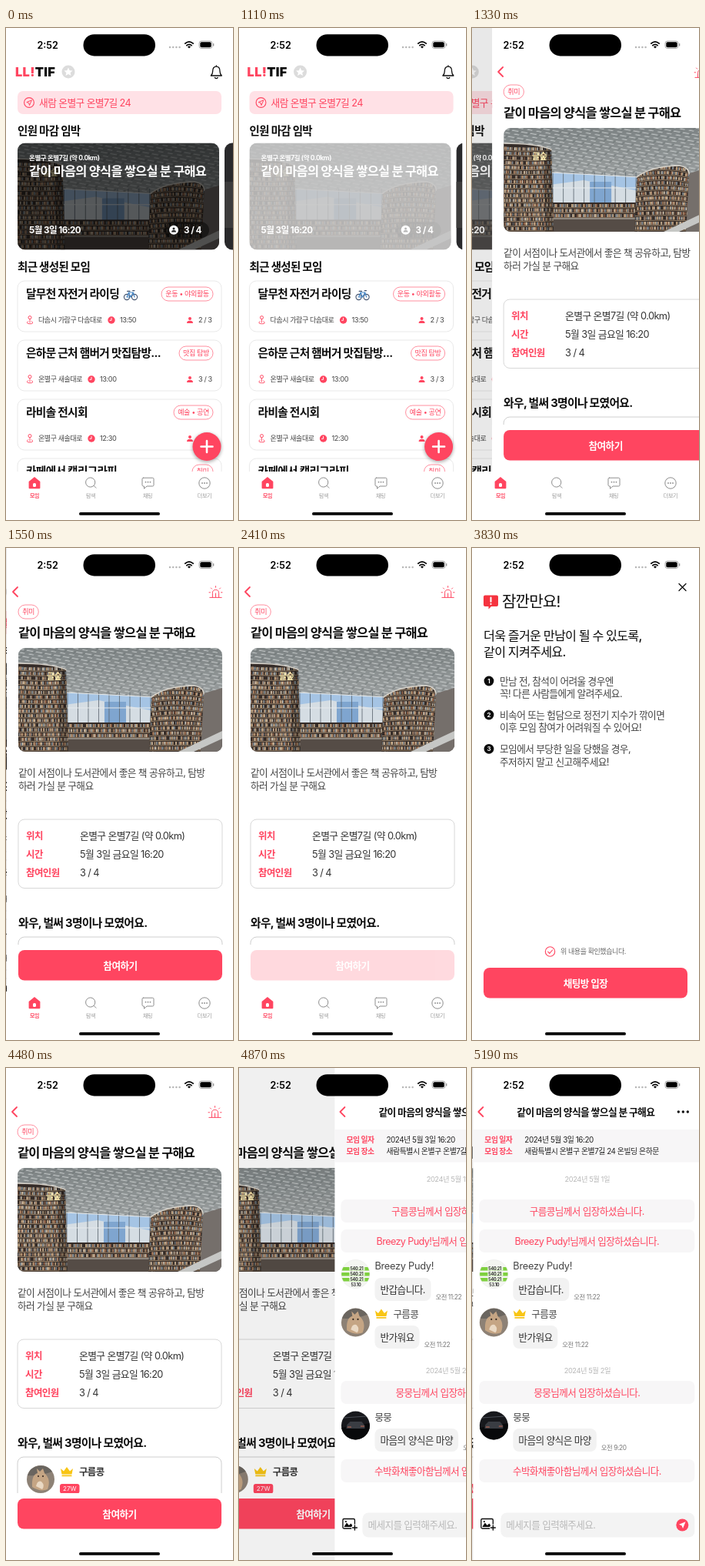
An HTML page for the animation above (6.44 s loop, 295 px wide and 640 px high).

```html
<!DOCTYPE html>
<html lang="ko">
<head>
<meta charset="utf-8">
<title>모임 앱</title>
<style>
html, body { margin: 0; width: 100%; height: 100%; overflow: hidden; background: #fff; }
svg { display: block; }
#stage { width: 295px; height: 640px; }
text { font-family: Inter, "Noto Sans CJK KR", "Noto Sans CJK", sans-serif; white-space: pre; }
.line { fill: none; stroke-linecap: round; stroke-linejoin: round; }
</style>
</head>
<body>
<svg id="stage" viewBox="0 0 295 640"></svg>
<script>
const W = 295, H = 640, LOOP = 6440;
const RED = '#ff4560', INK = '#0c0c0c', GREY = '#444', PALE = '#b9b9b9';

// --- drawing helpers ---
// y is the vertical middle of the line of text
const text = (s, x, y, size, fill = INK, weight = 400, anchor = 'start', track = -.047) =>
  `<text x="${x}" y="${(y + size * .37).toFixed(2)}" font-size="${size}" fill="${fill}" font-weight="${weight}" text-anchor="${anchor}" style="letter-spacing:${track}em">${s}</text>`;
const mid = (s, x, y, size, fill, weight, track) => text(s, x, y, size, fill, weight, 'middle', track);
const box = (x, y, w, h, r, fill, stroke = 'none', more = '') =>
  `<rect x="${x}" y="${y}" width="${w}" height="${h}" rx="${r}" fill="${fill}" stroke="${stroke}" ${more}/>`;
const dot = (x, y, r, fill, stroke = 'none', sw = 1) =>
  `<circle cx="${x}" cy="${y}" r="${r}" fill="${fill}" stroke="${stroke}" stroke-width="${sw}"/>`;
const shape = (d, fill) => `<path d="${d}" fill="${fill}"/>`;
const line = (d, stroke, sw = 1) => `<path class="line" d="${d}" stroke="${stroke}" stroke-width="${sw}"/>`;
const at = (x, y, s) => `<g transform="translate(${x} ${y})">${s}</g>`;
const group = (id, s) => `<g id="${id}">${s}</g>`;
const page = (id, s) => group(id, box(0, 0, W, H, 0, '#fff') + s);
const clip = (id, s) => `<g clip-path="url(#${id})">${s}</g>`;
const repeat = (n, fn) => Array.from({ length: n }, (_, i) => fn(i)).join('');

// --- shared pieces ---
const person = (x, y, c, k = 1) => at(x, y, `<g transform="scale(${k})">` +
  dot(0, -2, 2, c) + shape('M-4 4Q-4 .7 0 .7T4 4Z', c) + '</g>');
const crown = (x, y) => at(x, y,
  shape('M-8 -4L-4 -.5L0 -6L4 -.5L8 -4L6.5 3.5H-6.5Z', '#f8c514') + box(-6.5, 4.5, 13, 1.8, .5, '#f8c514'));
const pill = (s, right, y, w) =>
  box(right - w, y - 9, w, 18, 9, '#fff', RED, 'stroke-width=".6"') + mid(s, right - w / 2, y, 9.1, RED);
const back = line('M14 51L8 57L14 63', RED, 1.8);
const button = (y, s) => box(15, y, 265, 39.5, 8, RED) + mid(s, 147.5, y + 20, 12.7, '#fff', 600);

const avatar = {
  pet: (x, y, r) => at(x, y, `<g transform="scale(${r / 18})">` + dot(0, 0, 18, '#8d8175') +
    shape('M-17 -5A18 18 0 0 1 15 -10Q0 -4 -17 -5Z', '#6a655f') +
    shape('M-11 10Q-12 -6 -4 -8L-5 -14L-1 -10L3 -14L5 -8Q14 0 9 13Q0 17 -11 10Z', '#c5a584') +
    shape('M-6 9Q-4 1 1 3Q6 8 2 13Z', '#ead9c4') + dot(-3, -4, 1, '#2b211b') + dot(3, -4, 1, '#2b211b') + '</g>'),
  sheet: (x, y) => at(x, y, clip('round', box(-19, -19, 38, 38, 0, '#f4f6f1') +
    [-7, 0, 7].map(v => box(-19, v - 2, 38, 4.5, 0, '#7ed03f') + box(-8, v - 2, 20, 4.5, 0, '#e8f5dd') +
      text('540.21', -7, v + .2, 5.5, '#333', 700)).join('') + text('53.10', -6, 14, 5.5, '#333', 700)) +
    dot(0, 0, 18.5, 'none', '#e4e4e4', .5)),
  night: (x, y) => at(x, y, clip('round', box(-19, -19, 38, 38, 0, '#17181c') +
    shape('M-19 3L19 -3V19H-19Z', '#08090b') + shape('M-11 -1L-7 -5H8L12 0V4H-12Z', '#3a3d43') +
    line('M-10 2H-6M7 1H11', '#c96a55', 1.2) + line('M-15 -10L14 -12', '#494d55', 1)))
};

// --- library picture ---
let seed = 7;
const rand = () => (seed = seed * 16807 % 2147483647) / 2147483647;
const SPINES = ['#cfc2ae', '#93644a', '#77828a', '#b99b78'];
// one curved row of books standing on a pale board
const shelf = (x, y, w, bend) => {
  const d = dy => `M${x} ${y + dy}q${w / 2} ${bend} ${w} 0`;
  const row = c => `<path d="${d(0)}" fill="none" stroke="${c}" stroke-width="3.8" stroke-dasharray="${
    Array.from({ length: 6 }, (_, i) => (i % 2 ? 2 + rand() * 6 : .7 + rand() * 1.6).toFixed(1))}"/>`;
  return SPINES.map(row).join('') + line(d(2.8), '#ab9274', .8);
};
const tower = (id, d, x, y, w, bend) => shape(d, '#352c28') +
  clip(id, repeat(19, i => shelf(x, y + i * 6.2, w, bend * (1 - i / 12))));
const LEFT = 'M0 20Q42 20 62 28L65 135H0Z', RIGHT = 'M173 64Q190 50 228 49Q241 51 241 60L237 135H170Z';

const library = box(0, 0, 265, 135, 0, 'url(#roof)') + box(0, 0, 265, 80, 0, 'url(#tiles)') +
  shape('M60 58L176 64V122H60Z', '#a5c4e4') + shape('M60 74L104 68L176 82V105H60Z', '#d5dde3') +
  shape('M112 70H140V100H112Z', '#7fa5cf') +
  repeat(9, i => line(`M${64 + i * 13.5} 58V100`, '#59646d', .8)) +
  line('M60 78H176M60 58L176 64', '#e6eaec', 1) +
  box(60, 97, 118, 22, 0, '#352c28') + repeat(3, i => shelf(60, 101 + i * 6.5, 118, 0)) +
  box(60, 117, 205, 18, 0, '#554c46') + line('M60 118H176', '#c8c1b8', 1.2) +
  shape('M238 60L265 52V135H236Z', '#756f6b') +
  tower('leftTower', LEFT, -4, 26, 72, 3) + shape('M52 25L62 28L65 135H54Z', '#0004') +
  tower('rightTower', RIGHT, 168, 56, 76, -9) +
  line('M173 64Q190 50 228 49Q241 51 241 60M0 20Q42 20 62 28', '#d7d2c9', 1.4) +
  shape('M208 135L265 108V118L228 135Z', '#c6c7c5') +
  text('글숲', 37, 37, 11, '#ffeeb0', 700);
const photo = (x, y, w, h) =>
  `<svg x="${x}" y="${y}" width="${w}" height="${h}" viewBox="0 0 265 135" preserveAspectRatio="xMidYMid slice">${library}</svg>`;

// --- status bar ---
const status = group('status',
  text('2:52', 40.5, 22, 12.6, '#000', 600, 'start', 0) + box(100.5, 8.2, 93.5, 28.3, 14.1, '#000') +
  repeat(4, i => dot(213 + i * 4.2, 25, 1.2, '#b5b5b5')) +
  line('M232.8 20.2Q238 15.6 243.2 20.2M234.8 22.7Q238 19.9 241.2 22.7', '#000', 1.7) + shape('M235.9 24.3Q238 22.7 240.1 24.3L238 26.6Z', '#000') +
  box(251, 17, 17, 9.5, 3, 'none', '#999', 'stroke-width=".8"') + box(252.3, 18.3, 14.4, 6.9, 1.8, '#000') + box(269, 20, 1.3, 3.5, .6, '#999') +
  box(95, 630, 105, 3.8, 1.9, '#000'));

// --- home ---
const meeting = ([title, tag, tagW, place, clockX, time, count], i) => at(0, i * 77,
  box(15, 329, 265, 66, 9, '#fff', '#e9e9e9') + text(title, 26, 346, 14.7, INK, 700) + pill(tag, 269, 346, tagW) +
  dot(31, 376.6, 2, '#fff', RED, 1) + line('M31 378.8V383M28.6 381.6Q25 384.6 31 384.8T33.4 381.6', RED, .9) +
  text(place, 42, 380, 9, GREY) + dot(clockX, 380, 4.7, RED) + line(`M${clockX} 377.4V380.3H${clockX - 2}`, '#fff', .9) +
  text(time, clockX + 11, 380, 9.2, GREY) + person(239, 380, RED) + text(count, 250, 380, 9.2, GREY));

const bike = at(162, 348,
  dot(-5, 2, 3.6, 'none', '#40506b', 1.1) + dot(5, 2, 3.6, 'none', '#40506b', 1.1) +
  line('M-5 2L-2.5 -4H3.2L5 2M-2.5 -4L0 2L3.2 -4M-5 2H0', '#3f83c5', 1.1) + line('M-4.4 -5.6H-1M2.6 -6.4H5', '#40506b', 1.1));

const home = page('home',
  `<text x="12" y="63" font-size="16.4" font-weight="900" fill="${RED}" letter-spacing=".3">LL!<tspan fill="${INK}">TIF</tspan></text>` +
  dot(81, 57, 8.5, '#dcdcdc') + shape('M81 51.6L82.7 55.2L86.5 55.6L83.6 58.2L84.5 62L81 60L77.5 62L78.4 58.2L75.5 55.6L79.3 55.2Z', '#fff') +
  line('M266.3 62H280.3Q278 60 278 56.4Q278 50.2 273.3 50.2T268.6 56.4Q268.6 60 266.3 62ZM271.4 64.5Q273.3 66.6 275.2 64.5M273.3 48.8V50', INK, 1.3) +
  box(15, 82, 265, 30, 7, '#ffe1e6') + dot(30, 97, 6.4, 'none', RED, 1.1) + line('M33 94L26.8 96.6L29.6 97.4L30.4 100.2Z', RED, 1) +
  text('새람 온별구 온별7길 24', 43, 97, 12.75, RED) +
  text('인원 마감 임박', 15, 134, 14.5, INK, 700) +
  group('hero', clip('heroClip', photo(15, 149.5, 262, 139) + box(15, 149.5, 262, 139, 0, '#000', 'none', 'opacity=".6"')) +
    text('온별구 온별7길 (약 0.0km)', 30, 169, 8.5, '#fff', 700) + text('같이 마음의 양식을 쌓으실 분 구해요', 30, 186, 16.4, '#fff', 700) +
    text('5월 3일 16:20', 30, 262.5, 11.6, '#fff', 700) + box(206, 252, 58, 21.5, 10.7, '#0007') +
    dot(218, 262.7, 6, '#fff') + person(218, 262.4, '#222', .75) + text('3 / 4', 231, 262.7, 11.7, '#fff', 700)) +
  box(284, 149.5, 262, 139, 10, '#29292b') + box(284, 200, 30, 60, 0, '#3c3b3b') +
  text('최근 생성된 모임', 15, 310.5, 14.5, INK, 700) +
  [['달무천 자전거 라이딩', '운동 • 야외활동', 67, '다솜시 가람구 다솜대로', 137, '13:50', '2 / 3'],
   ['은하문 근처 햄버거 맛집탐방...', '맛집 탐방', 44, '온별구 새솔대로', 111, '13:00', '3 / 3'],
   ['라비솔 전시회', '예술 • 공연', 51, '온별구 새솔대로', 111, '12:30', '2 / 4'],
   ['카페에서 캘리그라피', '취미', 27, '온별구 새솔대로', 111, '12:00', '2 / 4']].map(meeting).join('') + bike +
  `<circle cx="261" cy="546" r="19" fill="#000" opacity=".3" filter="url(#soft)"/>` +
  dot(261, 544.5, 18.5, RED) + line('M253.5 544.5H268.5M261 537V552', '#fff', 2.6));

// --- tab bar ---
const tab = (s, x, c, w) => mid(s, x, 608.7, 7, c, w);
const tabs = group('tabs', box(0, 577, W, 63, 0, '#fff') +
  shape('M37 584L44.4 590V598.2Q44.4 599.3 43.3 599.3H30.7Q29.6 599.3 29.6 598.2V590Z', RED) + box(35, 592, 4, 5, 1.6, '#fff') +
  dot(109.7, 591, 6.1, 'none', '#8d8d8d', 1) + line('M114.2 595.5L117 598.3', '#8d8d8d', 1) +
  line('M178.5 585.2H190.5Q192 585.2 192 586.7V594.5Q192 596 190.5 596H183L179.5 599.2V596H178.5Q177 596 177 594.5V586.7Q177 585.2 178.5 585.2Z', '#8d8d8d', 1) +
  dot(258, 592, 7.2, 'none', '#8d8d8d', 1) +
  [-3, 0, 3].map(d => dot(184.5 + d, 590.7, .9, '#8d8d8d') + dot(258 + d, 592, .9, '#8d8d8d')).join('') +
  tab('모임', 37, RED, 700) + tab('탐색', 110, '#999') + tab('채팅', 184, '#999') + tab('더보기', 258, '#999'));

// --- meeting details ---
const fact = ([k, v], i) => text(k, 25, 374.3 + i * 23.8, 12.5, RED, 700) + text(v, 95, 374.3 + i * 23.8, 12.8, '#333');
const siren = line('M267.4 63.8V58.6Q267.4 54.4 271.5 54.4T275.6 58.6V63.8M263.8 64.4H279.2' +
  'M271.5 49.6V51.2M265.4 52L266.5 53.1M277.6 52L276.5 53.1M263 57.8H264.4M278.6 57.8H280M271.5 59V63.6', RED, 1);
const detail = page('detail', back + siren +
  pill('취미', 41.3, 83, 26.3) + text('같이 마음의 양식을 쌓으실 분 구해요', 15, 110, 16.4, INK, 700) +
  clip('photoClip', photo(15, 130, 265, 135)) +
  text('같이 서점이나 도서관에서 좋은 책 공유하고, 탐방', 15, 292.5, 12.7, GREY) + text('하러 가실 분 구해요', 15, 309, 12.7, GREY) +
  box(15, 353, 265, 89.5, 8, '#fff', '#d8d8d8') +
  [['위치', '온별구 온별7길 (약 0.0km)'], ['시간', '5월 3일 금요일 16:20'], ['참여인원', '3 / 4']].map(fact).join('') +
  text('와우, 벌써 3명이나 모였어요.', 15, 487.5, 14.8, INK, 700) +
  box(15, 506, 265, 120, 8, '#fff', '#cfcfcf') + avatar.pet(45, 535, 18) + crown(79, 525) + text('구름콩', 95, 525, 12.4, '#333', 600) +
  box(70, 541, 25.5, 12.5, 3, RED) + mid('27W', 82.8, 547.2, 8.2, '#fff', 400, 0) +
  group('joinBar', box(0, -7, W, 140, 0, '#fff') + group('join', button(0, '참여하기'))));

// --- rules sheet ---
const rule = ([y, a, b], i) => dot(22, y, 6.4, INK) + mid(i + 1, 22, y, 8, '#fff', 700, 0) +
  text(a, 36, y, 12.7, GREY) + text(b, 36, y + 16.5, 12.7, GREY);
const sheet = page('sheet',
  line('M269 46.5L278 55.5M278 46.5L269 55.5', INK, 1.3) +
  shape('M17 61.5H32Q34 61.5 34 63.5V74Q34 76 32 76H25L21.5 79.5V76H17Q15 76 15 74V63.5Q15 61.5 17 61.5Z', '#f5333f') +
  line('M24.5 64.5V69.8M24.5 72.8V73', '#fff', 2) +
  text('잠깐만요!', 39, 70, 20.2) + text('더욱 즐거운 만남이 될 수 있도록,', 15, 114.5, 16.2, INK, 500) + text('같이 지켜주세요.', 15, 135, 16.2, INK, 500) +
  [[173, '만남 전, 참석이 어려울 경우엔', '꼭! 다른 사람들에게 알려주세요.'],
   [217, '비속어 또는 험담으로 정전기 지수가 깎이면', '이후 모임 참여가 어려워질 수 있어요!'],
   [261.3, '모임에서 부당한 일을 당했을 경우,', '주저하지 말고 신고해주세요!']].map(rule).join('') +
  `<g id="agree" stroke="#555"><circle cx="101.5" cy="525" r="6.2" fill="none" stroke-width="1.1"/>` +
  `<path class="line" d="M98.7 525.2L100.8 527.3L104.5 523" stroke-width="1.1"/></g>` +
  text('위 내용을 확인했습니다.', 115, 525, 9, '#666') +
  `<g id="enter">${box(15, 546, 265, 39.5, 8, '#ececec')}${mid('채팅방 입장', 147.5, 566, 12.6, INK, 700)}</g>`);

// --- chat ---
const notice = (y, who) => box(8, y, 280, 30, 7, '#f7f6f7') + mid(`${who}님께서 입장하셨습니다.`, 148, y + 15, 12.6, RED);
const bubble = (y, w, s, time) => box(52, y, w, 30, 8, '#f2f2f2') + text(s, 59, y + 15, 12.7, '#333') + text(time, 58 + w, y + 25, 8.3, '#777');
const day = (n, y) => mid(`2024년 5월 ${n}일`, 148.5, y, 9.3, PALE);
const chat = page('chat', at(-1, 0, back) +
  mid('같이 마음의 양식을 쌓으실 분 구해요', 146.5, 57, 12.75, INK, 700) + [267, 273, 279].map(x => dot(x, 57, 1.7, INK)).join('') +
  box(0, 80, W, 42.5, 0, '#f7f6f7') +
  text('모임 일자', 15, 93.3, 9.8, RED, 700) + text('2024년 5월 3일 16:20', 67, 93.3, 9.9, '#222') +
  text('모임 장소', 15, 108.3, 9.8, RED, 700) + text('새람특별시 온별구 온별7길 24 온빌딩 은하문', 67, 108.3, 9.9, '#222') +
  day(1, 145) + notice(171, '구름콩') + notice(210, 'Breezy Pudy!') +
  avatar.sheet(27, 268) + text('Breezy Pudy!', 52, 257.5, 12.75, GREY, 400, 'start', -.02) + bubble(273, 73, '반갑습니다.', '오전 11:22') +
  avatar.pet(27, 331, 18.5) + crown(60.5, 319.5) + text('구름콩', 76, 320, 12.5, GREY) + bubble(335, 58, '반가워요', '오전 11:22') +
  day(2, 394) + notice(407, '뭉뭉') +
  avatar.night(27, 465) + text('뭉뭉', 52, 454, 12.5, GREY) + bubble(469, 108.5, '마음의 양식은 마양', '오전 9:20') + notice(509, '수박화채좋아함') +
  box(10.5, 586.5, 15.5, 12.5, 1.5, '#fff', INK, 'stroke-width="1.3"') + shape('M12 597L15.5 591.5L18.5 595L21 592.5L24.5 597Z', INK) + dot(14.5, 590, 1.1, INK) +
  dot(26, 598, 4.4, '#fff') + line('M26 595V601M23 598H29', INK, 1.4) +
  box(36, 578.5, 252, 32, 8, '#f3f3f3') + text('메세지를 입력해주세요.', 43, 594, 12.6, PALE) +
  dot(272, 594.5, 8, RED) + shape('M276.2 590.3L267.6 593.8L271.2 595.3L272.7 598.9Z', '#fff'));

const defs = `<defs>
  <linearGradient id="roof" x2="0" y2="1"><stop stop-color="#7d8384"/><stop offset=".6" stop-color="#a2a6a6"/></linearGradient>
  <pattern id="tiles" width="13" height="8" patternUnits="userSpaceOnUse" patternTransform="skewX(-28) rotate(9)">
    <path d="M0 1H9M6 5H13" stroke="#d3d8d8" stroke-width=".9"/><path d="M11 0V4" stroke="#6b7172" stroke-width=".7"/></pattern>
  <clipPath id="leftTower">${shape(LEFT)}</clipPath>
  <clipPath id="rightTower">${shape(RIGHT)}</clipPath>
  <clipPath id="heroClip">${box(15, 149.5, 262, 139, 10, '#000')}</clipPath>
  <clipPath id="photoClip">${box(15, 130, 265, 135, 9, '#000')}</clipPath>
  <clipPath id="round">${dot(0, 0, 18.5, '#000')}</clipPath>
  <filter id="soft" x="-50%" y="-50%" width="200%" height="200%"><feGaussianBlur stdDeviation="2"/></filter>
</defs>`;
const shade = id => box(0, 0, W, H, 0, '#000', 'none', `id="${id}" opacity="0"`);

const stage = document.getElementById('stage');
stage.innerHTML = defs + home + shade('shade1') + detail + tabs + shade('shade2') + chat + sheet + status;
const el = {};
for (const node of stage.querySelectorAll('[id]')) el[node.id] = node;

// --- motion ---
const TICKS = [0, 1110, 1220, 1330, 1440, 1550, 1990, 2410, 2530, 2630, 2740, 2840, 2940,
  3420, 3520, 3630, 3730, 3830, 4160, 4270, 4370, 4480, 4580, 4770, 4870, 4980, 5080, 5190];
const PUSH = 1110, JOIN = 2410, AGREE = 3420, ENTER = 4160, CHAT = 4770;

// critically damped spring, already 11 ms under way at its first tick
const spring = (t, start) => {
  if (t < start) return 0;
  const k = 17.5 * (t - start + 11) / 1000;
  return 1 - (1 + k) * Math.exp(-k);
};
const press = (t, start, low) => t < start ? 1 : Math.min(1, low + (1 - low) * Math.max(0, t - start - 40) / 250);
const move = (node, x, y) => node.setAttribute('transform', `translate(${x.toFixed(2)} ${y.toFixed(2)})`);
const set = (node, name, v) => node.setAttribute(name, v);

function draw(time) {
  const t = TICKS.findLast(k => k <= time);
  const push = spring(t, PUSH), next = spring(t, CHAT);

  move(el.home, -.3 * W * push, 0);
  set(el.shade1, 'opacity', .1 * push);
  set(el.hero, 'opacity', press(t, PUSH, .32));

  move(el.detail, W * (1 - push) - .3 * W * next, 0);
  set(el.shade2, 'opacity', .1 * next);
  set(el.join, 'opacity', press(t, JOIN, .2));
  const covered = t >= AGREE;
  move(el.joinBar, 0, covered ? 560 : 523);
  set(el.tabs, 'visibility', covered ? 'hidden' : 'visible');

  move(el.sheet, 0, H * (1 - spring(t, JOIN) + spring(t, ENTER)));
  const agreed = t > AGREE;
  set(el.agree, 'opacity', press(t, AGREE, .2));
  set(el.agree, 'stroke', agreed ? RED : '#555');
  set(el.enter, 'opacity', press(t, ENTER, .2));
  set(el.enter.children[0], 'fill', agreed ? RED : '#ececec');
  set(el.enter.children[1], 'fill', agreed ? '#fff' : INK);

  move(el.chat, W * (1 - next), 0);
}

const start = performance.now();
function frame() {
  draw((performance.now() - start) % LOOP);
  requestAnimationFrame(frame);
}
frame();
</script>
</body>
</html>
```
